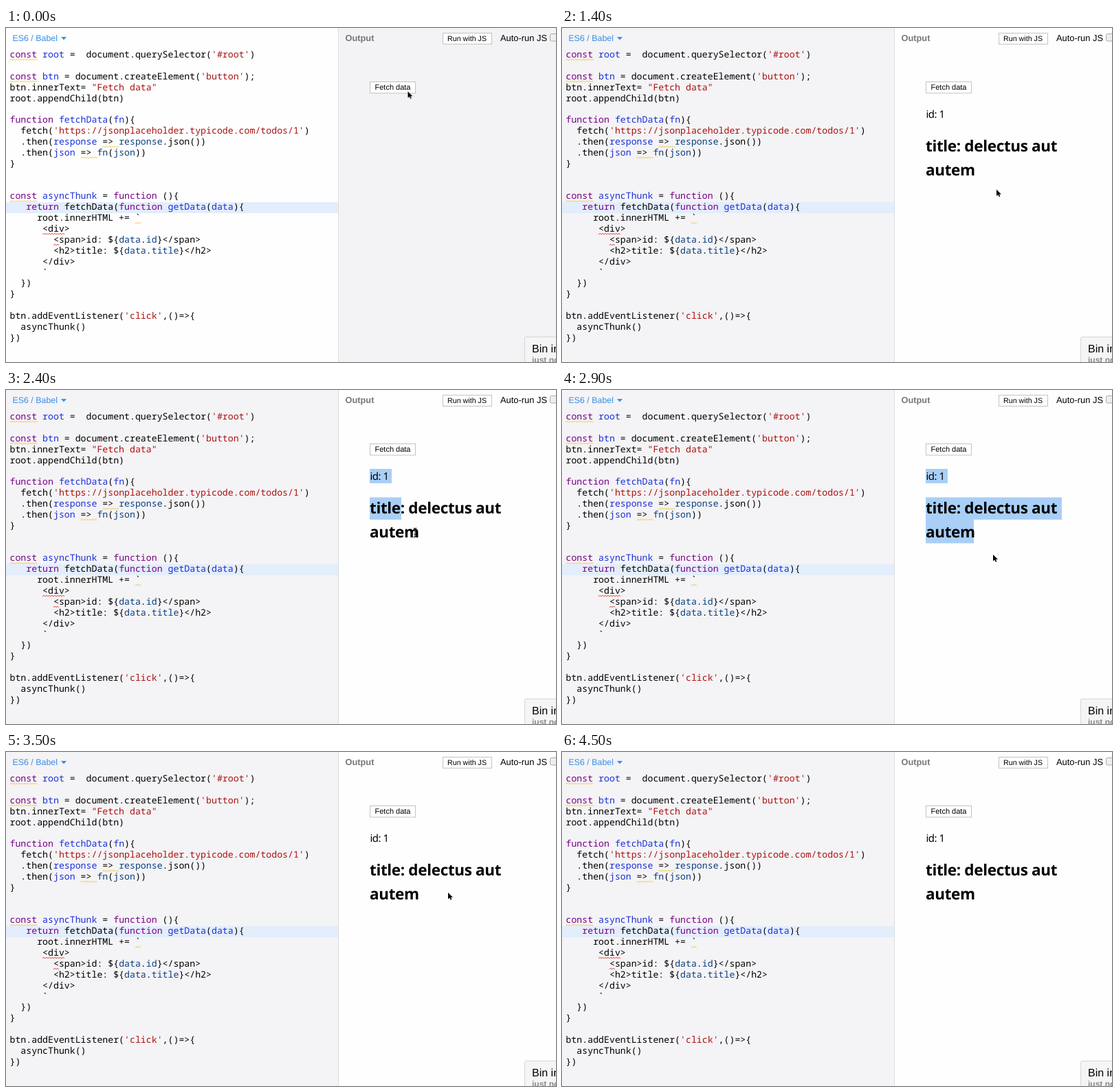
An HTML page for the animation above (4.6 s loop, 800 px wide and 487 px high).

```html
<!DOCTYPE html>
<html lang="en">
<head>
<meta charset="utf-8">
<title>Fetch demo</title>
<style>
  html, body { margin: 0; width: 100%; height: 100%; overflow: hidden; }
  body { position: relative; background: #fff; text-rendering: geometricPrecision; }
  svg, pre, .pane { position: absolute; top: 0; left: 0; margin: 0; }
  svg { width: 800px; height: 487px; font-family: "Liberation Sans", Arial, sans-serif; }
  .pane { width: 483px; height: 487px; animation: 4.6s step-end infinite; }
  .editor { background: #fefefe; animation-name: blur; }
  .output { left: 483px; width: 317px; background: #f3f2f4; animation-name: focus; }
  .line { position: absolute; top: 254px; width: 483px; height: 16px; background: #e3edfb; }

  pre { left: 5.5px; top: 31px; font: 13.22px/15.88px "Noto Sans Mono", monospace; color: #000; }
  pre b, pre i, pre u, pre s { font: inherit; text-decoration: none; }
  pre b { color: #708; }
  pre i { color: #1a30d8; }
  pre u { color: #0a3f80; }
  pre s { color: #a11; }

  .marks path { fill: none; stroke-width: 1; }
  .button { fill: #fff; stroke: #c3c3c3; }
  .grey { fill: #777; font-weight: bold; }
  .result { animation: show 4.6s step-end infinite; font-family: "Noto Sans", sans-serif; }
  .big { font-size: 22.5px; font-weight: bold; letter-spacing: -.35px; }
  .select rect { fill: #a9cff7; }
  .select .id { animation: pickId 4.6s step-end infinite; }
  .select .head { animation: pickHead 4.6s steps(3) infinite; }
  .select .tail { animation: pickTail 4.6s step-end infinite; }
  .cursor { animation: move 4.6s infinite; }
  .arrow { animation: arrow 4.6s step-end infinite; }
  .beam { animation: beam 4.6s step-end infinite; }

  @keyframes blur { 0% { background: #fefefe } 21.73%, 100% { background: #f4f3f5 } }
  @keyframes focus { 0% { background: #f3f2f4 } 21.73%, 100% { background: #fefefe } }
  @keyframes show { 0% { opacity: 0 } 26.08%, 100% { opacity: 1 } }
  @keyframes pickId { 0%, 67.39%, 100% { opacity: 0 } 43.47% { opacity: 1 } }
  @keyframes pickHead {
    0%, 45.65% { width: 0 }
    52.17% { width: 46px; animation-timing-function: step-end }
    54.34% { width: 198px; animation-timing-function: step-end }
    67.39%, 100% { width: 0 }
  }
  @keyframes pickTail { 0%, 67.39%, 100% { opacity: 0 } 54.34% { opacity: 1 } }
  @keyframes arrow { 0%, 58.69%, 100% { opacity: 1 } 36.95% { opacity: 0 } }
  @keyframes beam { 0%, 58.69%, 100% { opacity: 0 } 36.95% { opacity: 1 } }
  @keyframes move {
    0% { transform: translate(584.5px, 92.5px); animation-timing-function: steps(9) }
    19.56% { transform: translate(583px, 89px); animation-timing-function: step-end }
    26.08% { transform: translate(583px, 89px); animation-timing-function: steps(2) }
    30.43% { transform: translate(632px, 235.5px); animation-timing-function: steps(4) }
    39.13% { transform: translate(528px, 122px); animation-timing-function: steps(6) }
    52.17% { transform: translate(595px, 208px); animation-timing-function: steps(5) }
    63.04% { transform: translate(627px, 240px); animation-timing-function: steps(6) }
    76.08% { transform: translate(643px, 205px); animation-timing-function: steps(6) }
    89.13%, 100% { transform: translate(700px, 500px) }
  }
</style>
</head>
<body>
<div class="pane editor"></div>
<div class="pane output"></div>
<div class="line"></div>

<pre><b>const</b> <i>root</i> =  document.querySelector(<s>'#root'</s>)

<b>const</b> <i>btn</i> = document.createElement(<s>'button'</s>);
btn.innerText= <s>"Fetch data"</s>
root.appendChild(btn)

<b>function</b> <i>fetchData</i>(<i>fn</i>){
  fetch(<s>'https://jsonplaceholder.typicode.com/todos/1'</s>)
  .then(<i>response</i> =&gt; <u>response</u>.json())
  .then(<i>json</i> =&gt; <u>fn</u>(<u>json</u>))
}


<b>const</b> <i>asyncThunk</i> = <b>function</b> (){
   <b>return</b> fetchData(<b>function</b> <i>getData</i>(<i>data</i>){
     root.innerHTML += `
      &lt;div&gt;
        &lt;span&gt;id: ${<u>data</u>.<u>id</u>}&lt;/span&gt;
        &lt;h2&gt;title: ${<u>data</u>.<u>title</u>}&lt;/h2&gt;
      &lt;/div&gt;
      `
  })
}

btn.addEventListener(<s>'click'</s>,()=&gt;{
  asyncThunk()
})</pre>

<svg viewBox="0 0 800 487">
  <g class="marks"></g>
  <path d="M483.5 0V487" stroke="#dcdcde"/>

  <text x="9.5" y="19" font-size="12.4" fill="#3a8ee6">ES6 / Babel</text>
  <path d="M80 13h8l-4 4.5z" fill="#3a8ee6"/>

  <text class="grey" x="493.5" y="19" font-size="12.8">Output</text>
  <rect class="button" x="635.5" y="7.5" width="71" height="16"/>
  <text x="642" y="19" font-size="10.7">Run with JS</text>
  <text x="719" y="19" font-size="12.9">Auto-run JS</text>
  <rect x="791.5" y="8.5" width="12" height="10.5" rx="2" fill="#eee" stroke="#aaa"/>

  <rect class="button" x="529.5" y="78.5" width="66" height="16.5"/>
  <text x="536.5" y="90" font-size="11">Fetch data</text>

  <g class="select">
    <rect class="id" x="529" y="115" width="32" height="21"/>
    <rect class="head" x="529" y="156.5" height="32.5"/>
    <rect class="tail" x="529" y="189" width="70" height="34.5"/>
  </g>
  <g class="result">
    <text x="529.5" y="131" font-size="15" letter-spacing="-.5">id: 1</text>
    <text class="big" x="529" y="180">title: delectus aut</text>
    <text class="big" x="529" y="215">autem</text>
  </g>

  <rect x="754.5" y="450.5" width="60" height="50" rx="2" fill="#f5f5f5" stroke="#d6d6d6"/>
  <text x="765" y="473" font-size="16">Bin info</text>
  <text class="grey" x="765" y="487.5" font-size="12" fill-opacity=".85">just now</text>

  <g class="cursor">
    <path class="arrow" d="M0 0V9.6L2.3 7.5L3.8 10.8L5.4 10.1L3.9 6.9H7Z"
      stroke="#fff" stroke-width="1.4" paint-order="stroke"/>
    <path class="beam" fill="none" stroke="#222" stroke-width="1.2"
      d="M-2.5-6.5Q0-6.5 0-5V5Q0 6.5-2.5 6.5M2.5-6.5Q0-6.5 0-5M0 5Q0 6.5 2.5 6.5M-1.5 2.5H1.5"/>
  </g>
</svg>

<script>
  // Lint squiggles: row, column, length in characters, colour
  const ADVANCE = 7.93, LEADING = 15.88;
  const amber = '#f0c63c', red = '#e2493d';
  const squiggle = ([row, col, len, color]) => {
    const x = 5.5 + col * ADVANCE, y = 31 + (row + 1) * LEADING;
    const waves = Math.round(len * ADVANCE / 4);
    return `<path stroke="${color}" d="M${x} ${y}${'l2-1.5l2 1.5'.repeat(waves)}"/>`;
  };
  document.querySelector('.marks').innerHTML = [
    [0, 0, 5, amber], [2, 0, 5, amber], [13, 0, 5, amber],
    [8, 17, 3, amber], [9, 13, 3, amber], [15, 23, 1, amber],
    [16, 6, 4, red], [17, 8, 1, red]
  ].map(squiggle).join('');
</script>
</body>
</html>
```
